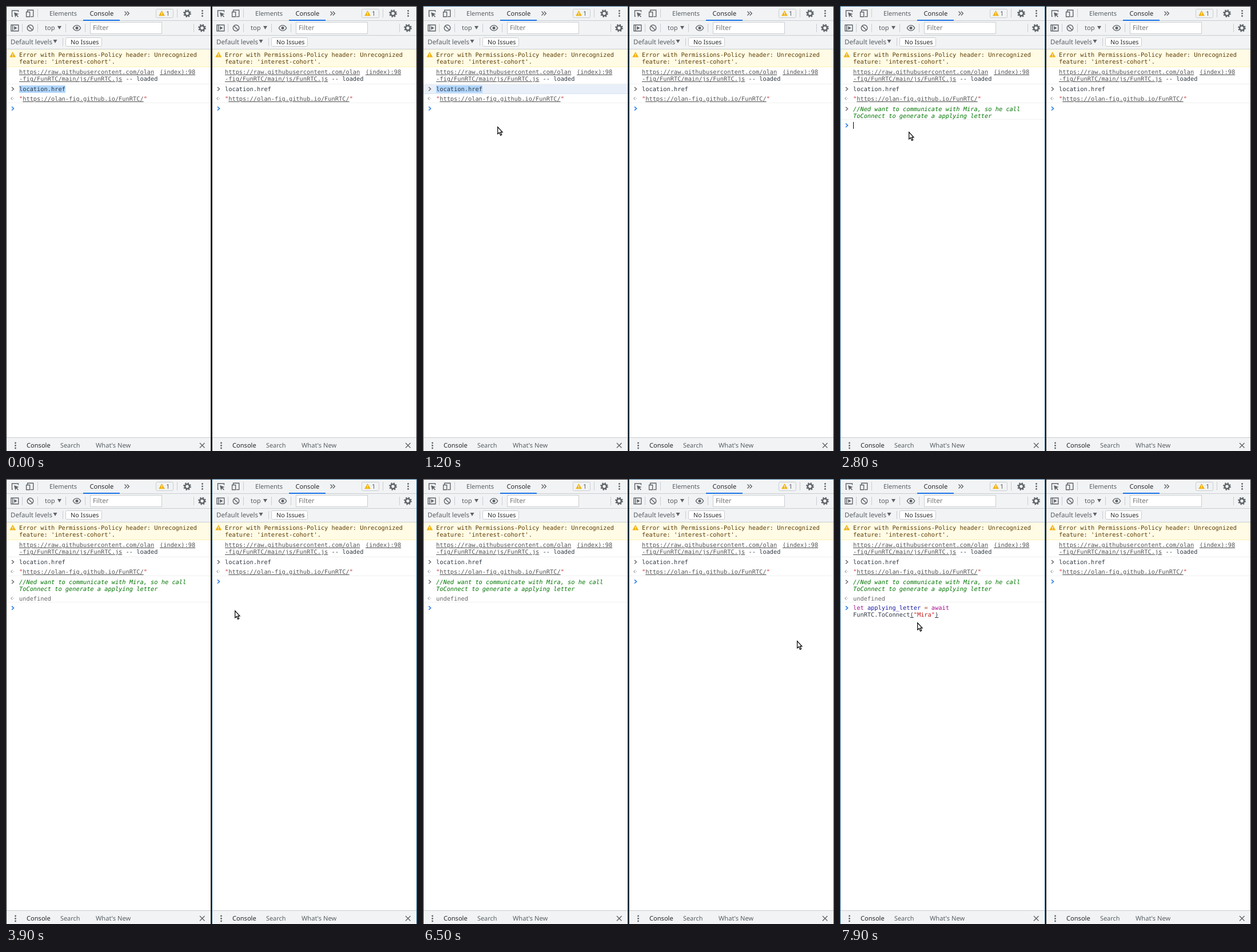
An HTML page for the animation above (8000 ms loop, 719 by 779 pixels).

```html
<!DOCTYPE html>
<html lang="en">
<head>
<meta charset="utf-8">
<title>Two consoles</title>
<style>
  html, body { margin: 0; width: 100%; height: 100%; overflow: hidden; background: #fff; }
  svg { display: block; }
  text { text-rendering: geometricPrecision; white-space: pre; }

  .ui { font: 11.1px "Noto Sans", "Open Sans", sans-serif; fill: #5a5e63; }
  .ui .dark { fill: #26282b; }
  .mono { font: 10.33px "DejaVu Sans Mono", monospace; fill: #303942; }
  .link { fill: #545454; text-decoration: underline; }
  .warn { fill: #5c3c00; }
  .string { fill: #c41a16; }
  .comment { fill: #007400; font-style: oblique; }
  .keyword { fill: #aa0d91; }
  .name { fill: #1a1aa6; }
  .operator { fill: #a0522d; }
  .match { text-decoration: underline; }
  .quiet { fill: #a6a6a6; }
  .value { fill: #666; }

  .bar { fill: #f1f3f4; }
  .rule { stroke: #cacdd1; fill: none; }
  .row { stroke: #f0f0f0; }
  .icon { stroke: #5f6368; fill: none; stroke-width: 1.4; }
  .solid { fill: #5f6368; }
  .box { fill: #fff; stroke: #cacdd1; }
  .caret { fill: #000; }
  .frame { fill: none; stroke: #202124; }
  .focus { stroke: #2e6389; }

  /* Every timed part is hidden unless its keyframes show it. */
  .timed { opacity: 0; animation: 8s step-end infinite; }
  #focus-left { animation-name: focus-left; }
  #focus-right { animation-name: focus-right; }
  #selection { animation-name: selection; }
  #hover { animation-name: hover; }
  #caret-empty { animation-name: caret-empty; }
  #caret-comment { animation-name: caret-comment; }
  #draft { animation-name: draft; }
  #preview { animation-name: preview; }
  #prompt-first { animation-name: prompt-first; }
  #entered { animation-name: entered; }
  #pending { animation-name: pending; }
  #done { animation-name: done; }
  #caret-next { animation-name: caret-next; }
  #code { animation-name: code; }
  #caret-code { animation-name: caret-code; }
  #pointer { animation-name: pointer; }

  @keyframes focus-left { 7.5% { opacity: 1 } 48.75% { opacity: 0 } 85%, to { opacity: 1 } }
  @keyframes focus-right {
    6.25% { opacity: 1 } 7.5% { opacity: 0 }
    48.75% { opacity: 1 } 51.25% { opacity: 0 }
    81.25% { opacity: 1 } 85% { opacity: 0 }
  }
  @keyframes selection { 0% { opacity: 1 } 20% { opacity: 0 } }
  @keyframes hover { 6.25% { opacity: 1 } 20% { opacity: 0 } }
  @keyframes caret-empty { 20% { opacity: 1 } 22.5% { opacity: 0 } }
  @keyframes draft { 22.5% { opacity: 1 } 35% { opacity: 0 } }
  @keyframes caret-comment { 22.5% { opacity: 1 } 30% { opacity: 0 } }
  @keyframes preview { 23.75% { opacity: 1 } 35% { opacity: 0 } }
  @keyframes prompt-first { 0% { opacity: 1 } 35% { opacity: 0 } }
  @keyframes entered { 35%, to { opacity: 1 } }
  @keyframes pending { 35% { opacity: 1 } 36.25% { opacity: 0 } }
  @keyframes done { 36.25%, to { opacity: 1 } }
  @keyframes caret-next {
    36.25% { opacity: 1 } 41.25% { opacity: 0 }
    85% { opacity: 1 } 91.25% { opacity: 0 }
  }
  @keyframes code { 91.25%, to { opacity: 1 } }
  @keyframes caret-code { 91.25% { opacity: 1 } 98.75% { opacity: 0 } }
  @keyframes pointer {
    6.25% { opacity: 1; transform: translate(600px, 190px) }
    7.5% { opacity: 1; transform: translate(291px, 206px) }
    8.75% { opacity: 1; transform: translate(222px, 209px) }
    10% { opacity: 1; transform: translate(178px, 211px) }
    11.25% { opacity: 1; transform: translate(152px, 211px) }
    12.5% { opacity: 1; transform: translate(138px, 211px) }
    13.75% { opacity: 1; transform: translate(132px, 211px) }
    15% { opacity: 1; transform: translate(130px, 211px) }
    23.75% { opacity: 1; transform: translate(128px, 212px) }
    30% { opacity: 1; transform: translate(124px, 217px) }
    31.25% { opacity: 1; transform: translate(120px, 220px) }
    48.75% { opacity: 1; transform: translate(400px, 230px) }
    50% { opacity: 1; transform: translate(640px, 262px) }
    51.25% { opacity: 0; transform: translate(640px, 262px) }
    81.25% { opacity: 1; transform: translate(654px, 283px) }
    82.5% { opacity: 1; transform: translate(560px, 276px) }
    83.75% { opacity: 1; transform: translate(430px, 268px) }
    85% { opacity: 1; transform: translate(290px, 258px) }
    86.25% { opacity: 1; transform: translate(190px, 253px) }
    87.5%, to { opacity: 1; transform: translate(135px, 251px) }
  }
</style>
</head>
<body>
<svg width="719" height="779" viewBox="0 0 719 779">
  <defs>
    <g id="gear" class="icon">
      <circle r="4" stroke-width="2.6"/>
      <circle r="5.9" stroke-width="2" stroke-dasharray="2.32"/>
    </g>
    <g id="dots" class="solid">
      <circle cy="-4.5" r="1.4"/><circle r="1.4"/><circle cy="4.5" r="1.4"/>
    </g>
    <g id="alert">
      <path d="M0-4.6L4.9 4H-4.9Z" fill="#f2b20a" stroke="#f2b20a" stroke-linejoin="round" stroke-width=".6"/>
      <path d="M0-1.8V1.2M0 2V3.1" stroke="#fff" stroke-width="1.1"/>
    </g>
    <path id="down" class="solid" d="M-3.5-3H3.5L0 3Z"/>
    <path id="chevron" d="M-2-3.2L1.5 0-2 3.2" fill="none" stroke-width="1.5"/>
    <path id="return" d="M0-2.6L-2.8 0 0 2.6M1 0H2.6" fill="none" stroke="#a3a7ab" stroke-width="1.1"/>

    <g id="panel">
      <rect class="bar" width="358" height="75.5"/>
      <rect class="bar" y="755.5" width="358" height="24"/>
      <path class="rule" d="M0 25.5H358M0 51.5H358M0 75.5H358M0 755.5H358M55.5 5V20M299.5 5V20M28.5 31V46M55.5 31V46M104.5 31V46M138.5 31V46M328.5 31V46M99.5 56V70"/>
      <rect x="135" y="24" width="64" height="2" fill="#1a73e8"/>

      <!-- tab strip -->
      <path class="icon" d="M12 18H10.5V8H21.5V10.5"/>
      <path class="solid" d="M14 11L22.5 14 19 15.4 22 18.5 20.8 19.6 17.8 16.6 16.2 20Z"/>
      <path class="icon" d="M37.6 10V7.3H47.7V18.6H43M35.6 10.5H41.6V18.8H35.6Z"/>
      <path class="icon" d="M207.5 9.5L211 13 207.5 16.5M211.8 9.5L215.3 13 211.8 16.5"/>
      <rect class="rule" x="262.5" y="5.5" width="30" height="15" rx="2"/>
      <use href="#alert" x="272.5" y="13"/>
      <use href="#gear" x="317" y="13"/>
      <use href="#dots" x="343.5" y="13"/>

      <!-- console toolbar -->
      <path class="icon" d="M9 33.3H21.8V43.7H9ZM11.8 33V44"/>
      <path class="solid" d="M14.2 35.3L19.5 38.5 14.2 41.7Z"/>
      <circle class="icon" cx="42.5" cy="38.5" r="5.3"/>
      <path class="icon" d="M38.8 34.8L46.2 42.2"/>
      <use href="#down" x="93.5" y="38"/>
      <path class="icon" d="M117.3 38.5C120.5 32.3 127.5 32.3 130.7 38.5C127.5 44.7 120.5 44.7 117.3 38.5Z"/>
      <circle class="solid" cx="124" cy="38.5" r="2.5"/>
      <rect class="box" x="147.5" y="28.5" width="125" height="20"/>
      <use href="#gear" x="343" y="38.5"/>
      <use href="#down" x="86" y="62"/>
      <rect class="box" x="104.5" y="55.5" width="63" height="15" rx="2"/>

      <!-- drawer -->
      <use href="#dots" x="16.5" y="769.5"/>
      <path class="icon" d="M339 765L347.5 773.5M347.5 765L339 773.5"/>

      <g class="ui">
        <text x="76" y="17">Elements</text>
        <text x="146.5" y="17" class="dark">Console</text>
        <text x="280" y="17">1</text>
        <text x="68" y="42">top</text>
        <text x="152" y="42" style="font-size:11.6px;fill:#757575">Filter</text>
        <text x="8" y="67" style="font-size:11.6px">Default levels</text>
        <text x="113" y="67" class="dark" style="font-size:10.8px">No Issues</text>
        <text x="36" y="773" class="dark">Console</text>
        <text x="95" y="773" style="font-size:10.9px">Search</text>
        <text x="157" y="773">What's New</text>
      </g>

      <!-- messages -->
      <rect y="76" width="358" height="30" fill="#fffbe5"/>
      <path d="M0 106.5H358" stroke="#fff0b3"/>
      <path class="row" d="M0 136.5H358M0 169.5H358"/>
      <use href="#alert" x="11.7" y="85.3"/>
      <use href="#chevron" x="12" y="145.3" stroke="#6e6e6e"/>
      <use href="#return" x="11.5" y="162"/>
      <g class="mono">
        <text x="23" y="89" class="warn">Error with Permissions-Policy header: Unrecognized</text>
        <text x="23" y="101" class="warn">feature: 'interest-cohort'.</text>
        <text x="23" y="119" class="link">https://raw.githubusercontent.com/olan</text>
        <text x="269" y="119" class="link">(index):98</text>
        <text x="23" y="131"><tspan class="link">-fig/FunRTC/main/js/FunRTC.js</tspan> -- loaded</text>
        <text x="23" y="149">location.href</text>
        <text x="23" y="166" class="string">"<tspan class="link">https://olan-fig.github.io/FunRTC/</tspan>"</text>
      </g>
    </g>

    <g id="note" class="mono">
      <text x="23" y="183" class="comment">//Ned want to communicate with Mira, so he call</text>
      <text x="23" y="195" class="comment">ToConnect to generate a applying letter</text>
    </g>
  </defs>

  <rect width="719" height="779" fill="#fff"/>
  <g id="hover" class="timed">
    <rect x="1" y="136" width="357" height="17" fill="#e9eff8"/>
    <path d="M1 136.5H358M1 153.5H358" stroke="#d3e1f5"/>
  </g>
  <rect id="selection" class="timed" x="23" y="139" width="81" height="13" fill="#b1d6fd"/>

  <use href="#panel"/>
  <use href="#panel" x="360"/>
  <use href="#chevron" x="372" y="179.5" stroke="#1a73e8"/>

  <use id="prompt-first" class="timed" href="#chevron" x="12" y="179.5" stroke="#1a73e8"/>
  <rect id="caret-empty" class="timed caret" x="23" y="173" width="1" height="12"/>

  <g id="draft" class="timed"><use href="#note"/></g>
  <rect id="caret-comment" class="timed caret" x="266" y="185" width="1" height="12"/>
  <g id="preview" class="timed">
    <use href="#return" x="11.5" y="208"/>
    <text x="23" y="212" class="mono quiet">undefined</text>
  </g>

  <g id="entered" class="timed">
    <use href="#chevron" x="12" y="180" stroke="#6e6e6e"/>
    <use href="#note" y="1"/>
  </g>
  <g id="pending" class="timed">
    <path class="row" d="M1 198.5H358"/>
    <use href="#chevron" x="12" y="209" stroke="#1a73e8"/>
    <rect class="caret" x="23" y="203" width="1" height="12"/>
  </g>
  <g id="done" class="timed">
    <use href="#return" x="11.5" y="209"/>
    <text x="23" y="213" class="mono value">undefined</text>
    <path class="row" d="M1 215.5H358"/>
    <use href="#chevron" x="12" y="225.8" stroke="#1a73e8"/>
  </g>
  <rect id="caret-next" class="timed caret" x="23" y="219" width="1" height="12"/>

  <g id="code" class="timed mono">
    <text x="23" y="229"><tspan class="keyword">let</tspan> <tspan class="name">applying_letter</tspan> <tspan class="operator">=</tspan> <tspan class="keyword">await</tspan></text>
    <text x="23" y="241">FunRTC.ToConnect<tspan class="match">(</tspan><tspan class="string">"Mira"</tspan><tspan class="match">)</tspan></text>
  </g>
  <rect id="caret-code" class="timed caret" x="172" y="231" width="1" height="12"/>

  <!-- window borders -->
  <rect x="358" width="3" height="779" fill="#202124"/>
  <path class="frame" d="M.5 779V.5H718.5V779"/>
  <path id="focus-left" class="timed frame focus" d="M.5 779V.5H358.5V779"/>
  <path id="focus-right" class="timed frame focus" d="M360.5 779V.5H718.5V779"/>

  <path id="pointer" class="timed" d="M.7 .8V12.9L3.5 10.5 5.6 15.4 7.7 14.5 5.6 9.8H9Z" fill="#fff" stroke="#000" stroke-width="1.2"/>
</svg>
</body>
</html>
```
